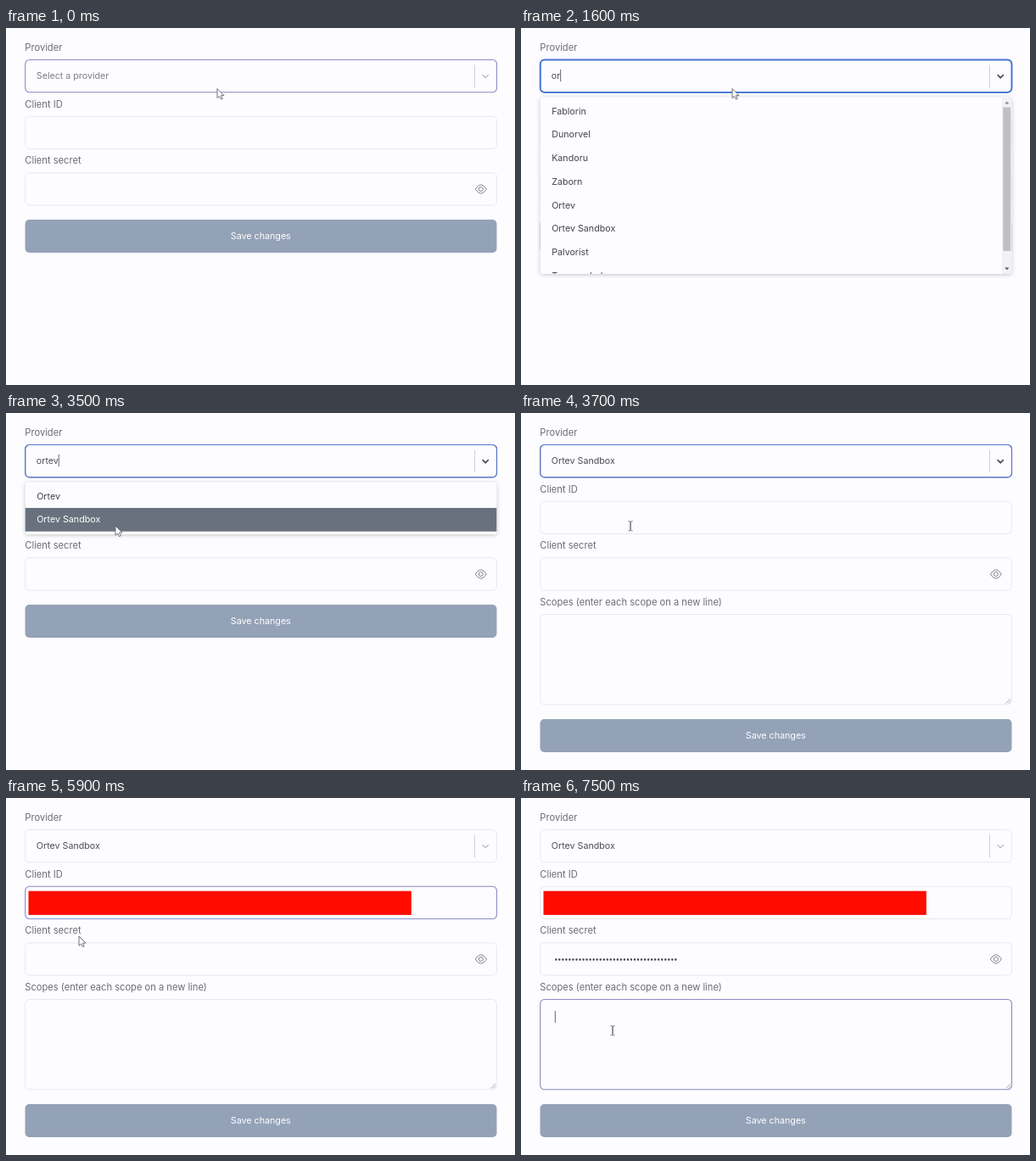
An HTML page for the animation above (8000 ms loop, 600 by 421 pixels).

```html
<!DOCTYPE html>
<html lang="en">
<head>
<meta charset="utf-8">
<title>Provider settings</title>
<style>
  html, body { margin: 0; width: 100%; height: 100%; overflow: hidden; background: #fdfcfe; }
  svg { display: block; }
  text { font-family: Inter, "Open Sans", sans-serif; font-size: 10.7px; }
  .menu { filter: drop-shadow(0 1px 2.5px rgba(0, 0, 0, .22)); }
</style>
</head>
<body>
<svg id="stage" width="600" height="421" viewBox="0 0 600 421"></svg>
<script>
const LOOP = 8000, STEP = 100;
const ROW = 27.75, MENU_TOP = 81.5, MENU_MAX = 208.5;
const LIGHT = '#e9e8ee', FOCUS = '#8b8fc6', BLUE = '#4674d3';
const CHOICE = 'Ortev Sandbox';
const providers = [
  'Fablorin', 'Dunorvel', 'Kandoru', 'Zaborn', 'Ortev', CHOICE, 'Palvorist', 'Tumecorbel',
  'Umbolan', 'Vexolin', 'Vinquam', 'Wendolu', 'Yarbim', 'Zelquin'
];

// [time, typed text]
const typing = [[0, ''], [1200, 'o'], [1600, 'or'], [1900, 'ort'], [2100, 'orte'], [2300, 'ortev']];
// [time, x, y]
const pointerPath = [
  [0, 249, 71.5], [2800, 249, 71.5], [2900, 226, 92], [3300, 129, 133],
  [5800, 129.5, 133], [5900, 86, 163], [6100, 85, 181], [6800, 85, 181],
  [7200, 108, 274], [LOOP, 108, 274]
];

const between = (t, a, b) => t >= a && t < b;
const smooth = p => p * p * (3 - 2 * p);
const ramp = (t, a, b) => smooth(Math.min(1, Math.max(0, (t - a) / (b - a))));
const pulse = (t, on, off, fade = 200) => ramp(t, on, on + fade) - ramp(t, off, off + fade);

const text = (x, y, s, fill = '#4d4d56', extra = '') =>
  `<text x="${x}" y="${y}" fill="${fill}" ${extra}>${s}</text>`;
const label = (y, s) => text(22.3, y, s, '#6c6c76', 'style="font-size:11.15px"');
const rect = (x, y, w, h, fill, extra = '') =>
  `<rect x="${x}" y="${y}" width="${w}" height="${h}" fill="${fill}" ${extra}/>`;
const line = (d, stroke, width = 1, extra = '') =>
  `<path d="${d}" fill="none" stroke="${stroke}" stroke-width="${width}" ${extra}/>`;
const outline = (y, h, color, width = 1, alpha = 1) =>
  rect(22.7, y, 555.8, h, 'none', `rx="5" stroke="${color}" stroke-width="${width}" opacity="${alpha}"`);
const field = (y, h, focus) => outline(y, h, LIGHT) + outline(y, h, FOCUS, 1.1, focus);
const caret = (x, y, h = 14) => line(`M${x} ${y}v${h}`, '#55555f', .9);

function pointerAt(t) {
  const i = pointerPath.findIndex(p => p[0] > t);
  const [t0, x0, y0] = pointerPath[i - 1], [t1, x1, y1] = pointerPath[i];
  const p = smooth((t - t0) / (t1 - t0));
  return { x: x0 + (x1 - x0) * p, y: y0 + (y1 - y0) * p };
}

function pointer(t, { x, y }) {
  const overText = t >= 3700 && (between(y, 104, 143) || between(y, 171, 210) || between(y, 237, 345));
  const shape = overText
    ? line('M-2.5 -5.5q2.5 0 2.5 1.5v8.5q0 1.5 -2.5 1.5M2.5 -5.5q-2.5 0 -2.5 1.5v8.5q0 1.5 2.5 1.5', '#63636b', .9)
    : '<path d="M0 0V11.2L2.6 8.9L4.4 12.6L6.2 11.8L4.5 8.1H8Z" fill="#fff" stroke="#62626a" stroke-width=".9"/>';
  return `<g transform="translate(${x} ${y})">${shape}</g>`;
}

function scrollbar(count) {
  const thumb = 186 * (MENU_MAX + 1) / (count * ROW + 8);
  return rect(567, 82, 11, 208, '#f2f1f4') + rect(568.2, 93.5, 9, thumb, '#c0c0c3')
    + '<path d="M570.3 89.5h5l-2.5 -3z" fill="#8a8a8e"/><path d="M570.3 282.5h5l-2.5 3z" fill="#55555a"/>';
}

function menu(t, query, mouse) {
  const items = providers.filter(name => name.toLowerCase().includes(query));
  const full = items.length * ROW + 6;
  const height = Math.min(MENU_MAX, full);
  const hovered = t >= 3000 ? Math.floor((mouse.y - 84.2) / ROW) : -1;
  const rows = items.map((name, i) => {
    const y = 2.7 + i * ROW, on = i === hovered;
    return (on ? rect(0, y, 556, ROW, '#69717e') : '') + text(13.7, y + 17.5, name, on ? '#fff' : '#43434c');
  }).join('');
  return rect(22.7, MENU_TOP, 555.8, height, '#fdfcfe', 'rx="3" class="menu"')
    + `<svg x="22.5" y="${MENU_TOP}" width="556" height="${height}">${rows}</svg>`
    + (full > MENU_MAX ? scrollbar(items.length) : '');
}

function select(t, query, open) {
  const active = between(t, 100, 4500);
  const chosen = t >= 3700;
  const blinkOff = between(t, 600, 1200) || between(t, 2400, 2900) || between(t, 3300, 3500);
  const shown = chosen ? CHOICE : query || 'Select a provider';
  const hover = 1 - ramp(t, 4400, 4700);
  return label(26.8, 'Provider')
    + field(37.5, 38.3, hover)
    + outline(37.5, 38.3, '#5c76cb', 1.2, pulse(t, 0, 4400, 300))
    + outline(37.5, 38.3, BLUE, 1.8, pulse(t, 0, 2950))
    + text(35.8, 60.4, shown, chosen || query ? '#4d4d56' : '#7d7d87', 'id="value"')
    + line('M552.5 43.5v26.5', '#d0d0d6')
    + line('M561.6 55.2l3.6 3.5l3.6 -3.5', active ? '#50505a' : '#b9b9c0', active ? 1.7 : 1.3);
}

function eye() {
  return line('M553.2 190q6.6 -10.4 13.2 0q-6.6 10.4 -13.2 0z', '#85858d')
    + '<circle cx="559.8" cy="190" r="2.5" fill="none" stroke="#85858d"/>';
}

function saveButton(y) {
  return rect(22.5, y, 556, 39, '#94a2b8', 'rx="5"')
    + text(300.3, y + 23.4, 'Save changes', '#fff', 'text-anchor="middle"');
}

function credentials(t) {
  const pasted = t >= 6700;
  return label(93.5, 'Client ID') + field(104.3, 38.2, pulse(t, 4500, 6300))
    + label(160.2, 'Client secret') + field(170.8, 38.2, pulse(t, 6300, 7300))
    + eye()
    + (pasted ? line('M41.3 190.5H182.6', '#3f3f48', 2.5, 'stroke-linecap="round" stroke-dasharray="0 4.03"') : '')
    + (between(t, 6400, 7000) ? caret(pasted ? 184.6 : 40, 183.5) : '');
}

function scopes(t) {
  return label(226.8, 'Scopes (enter each scope on a new line)')
    + field(237.5, 106.3, pulse(t, 7300, LOOP))
    + line('M571.5 342.5l5.5 -5.5M574.5 342.5l2.5 -2.5', '#9a9aa2', .8)
    + (t >= 7400 ? caret(40.3, 251) : '');
}

const stage = document.getElementById('stage');

function draw(t) {
  const query = typing.filter(([at]) => at <= t).pop()[1];
  const open = between(t, 100, 3700);
  const chosen = t >= 3700;
  const mouse = pointerAt(t);
  stage.innerHTML = rect(0, 0, 600, 421, '#fdfcfe')
    + select(t, query, open)
    + credentials(t)
    + (chosen ? scopes(t) : '')
    + saveButton(chosen ? 361 : 226)
    + (open ? menu(t, query, mouse) : '')
    + pointer(t, mouse)
    + (t >= 4400 ? rect(26.5, 109.7, 451.3, 28.2, '#ff0b00') : '');

  // The caret follows the measured end of the typed text.
  const blinkOff = between(t, 600, 1200) || between(t, 2400, 2900) || between(t, 3300, 3500);
  if (open && !blinkOff) {
    const width = query ? document.getElementById('value').getComputedTextLength() : 0;
    stage.insertAdjacentHTML('beforeend', caret(36.2 + width, 49));
  }
}

let start, last;
function tick(now) {
  start ??= now;
  const t = Math.floor((now - start) % LOOP / STEP) * STEP;
  if (t !== last) draw(last = t);
  requestAnimationFrame(tick);
}
requestAnimationFrame(tick);
</script>
</body>
</html>
```
